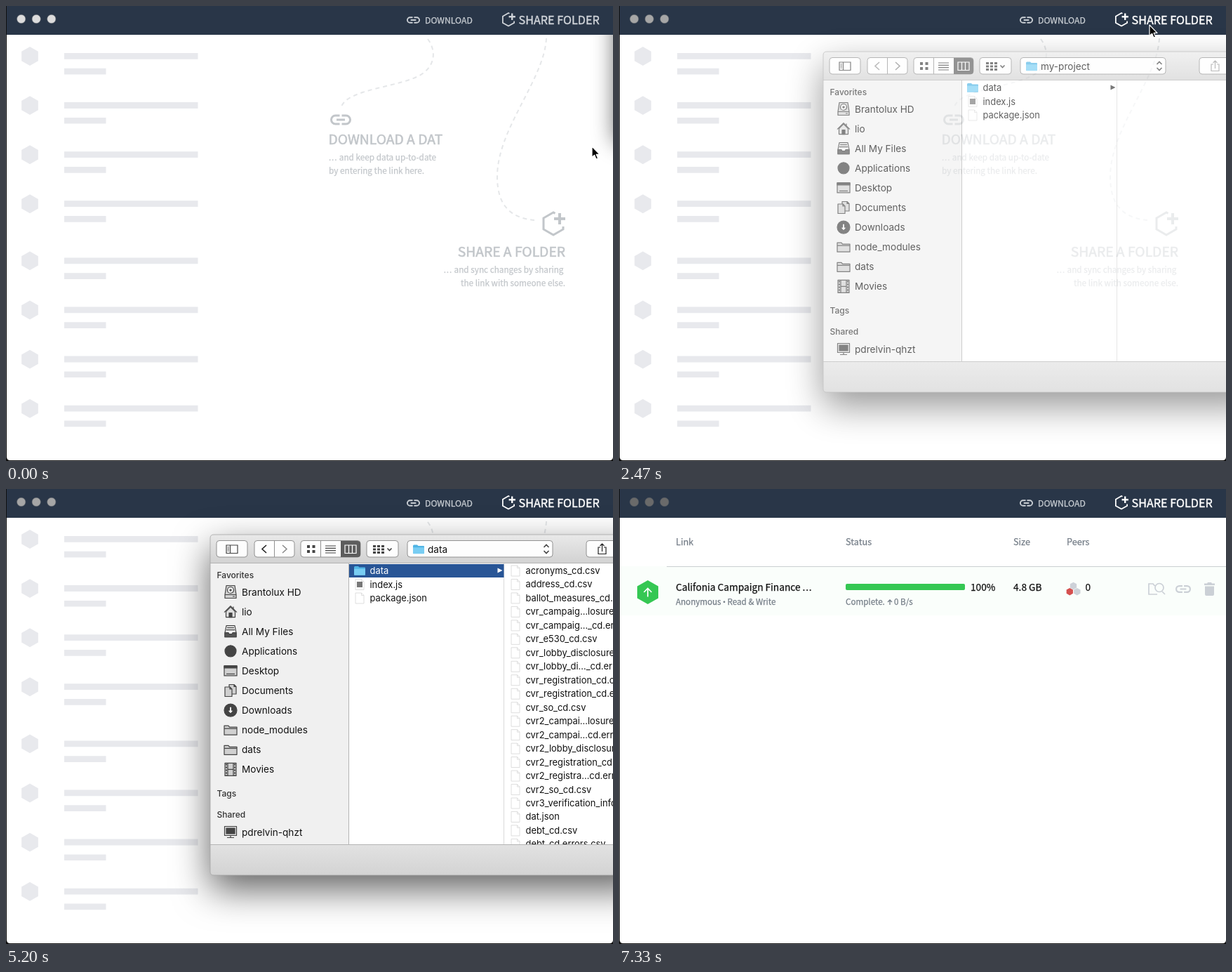
These frames come from a looping animation (865x648 px, 7390 ms). An HTML page:

```html
<!DOCTYPE html>
<html lang="en">
<head>
<meta charset="utf-8">
<title>Sharing a folder</title>
<style>
html, body { margin: 0; width: 100%; height: 100%; overflow: hidden; background: #111; }
svg { display: block; width: 865px; height: 648px; }
text { white-space: pre; }
.ui { font-family: "Noto Sans CJK SC", "Noto Sans CJK JP", "Noto Sans CJK", sans-serif; font-size: 11.6px; fill: currentColor; stroke: currentColor; stroke-width: .25px; }
.mac { font-family: Inter, sans-serif; font-size: 13.6px; fill: #111; }
.small { font-size: 12.9px; }
.label { font-size: 12px; font-weight: 500; fill: #333; }
.hint { font-size: 11.75px; }
.big { font-size: 19.3px; stroke-width: .6px; }
.col { font-size: 12.7px; }
.main { font-size: 13.7px; color: #111; }
.end { text-anchor: end; }
.dots { letter-spacing: .8px; }
.bullet { font-family: Roboto, sans-serif; }
.line { fill: none; stroke: currentColor; }
.button { fill: #fdfdfd; stroke: #919191; }

.lights, .share, .edge, .empty, .list, .before, .after, .dialog, .closed, .opened, .nav, .glow, .cursor, .arrow, .hand {
  animation: 7390ms linear infinite;
}
.lights { animation-name: lights; animation-timing-function: step-end; }
.share { animation-name: share; }
.edge { animation-name: edge; }
.empty { animation-name: empty; animation-timing-function: step-end; }
.list { animation-name: list; animation-timing-function: step-end; }
.before { animation-name: before; animation-timing-function: step-end; }
.after { animation-name: after; animation-timing-function: step-end; }
.dialog { animation-name: dialog; }
.closed { animation-name: closed; animation-timing-function: step-end; }
.opened { animation-name: opened; animation-timing-function: step-end; }
.nav { animation-name: nav; animation-timing-function: step-end; }
.glow { animation-name: glow; }
.cursor { animation-name: cursor; animation-timing-function: ease-in-out; }
.arrow { animation-name: arrow; animation-timing-function: step-end; }
.hand { animation-name: hand; animation-timing-function: step-end; }

@keyframes lights { 0% { fill: #dcdcdc } 28% { fill: #6a6a6a } 33.4% { fill: #a6a6a6 } 74% { fill: #6a6a6a } }
@keyframes share { 0%, 26.1% { color: #d0d4d9 } 29%, 100% { color: #fff } }
@keyframes edge { 0%, .9% { opacity: .62 } 6.3%, 100% { opacity: 0 } }
@keyframes empty { 0% { visibility: visible } 74%, 100% { visibility: hidden } }
@keyframes list { 0% { visibility: hidden } 74%, 100% { visibility: visible } }
@keyframes before { 0% { opacity: 1 } 76.7%, 100% { opacity: 0 } }
@keyframes after { 0% { opacity: 0 } 76.7%, 100% { opacity: 1 } }
@keyframes dialog {
  0%, 33.39% { opacity: 0 } 33.4% { opacity: .65 } 34.2% { opacity: .95 }
  36.9%, 73.99% { opacity: 1 } 74%, 100% { opacity: 0 }
}
@keyframes closed { 0% { opacity: 1 } 46.9%, 100% { opacity: 0 } }
@keyframes opened { 0% { opacity: 0 } 46.9%, 100% { opacity: 1 } }
@keyframes nav { 0% { color: #999 } 46.9%, 100% { color: #222 } }
@keyframes glow { 0%, 74% { opacity: 1 } 82.9% { opacity: .14 } 100% { opacity: .12 } }
@keyframes cursor {
  0%, .95% { transform: translate(835px, 200px) }
  6.36%, 10.83% { transform: translate(811px, 218px) }
  16.24% { transform: translate(747px, 51px) }
  20.7%, 26.1% { transform: translate(748px, 27px) }
  28%, 40.6% { transform: translate(756px, 27px) }
  45.06%, 57.78% { transform: translate(677px, 118px) }
  60.49%, 67.66% { transform: translate(790px, 264px) }
  70.37%, 100% { transform: translate(885px, 500px) }
}
@keyframes arrow { 0% { opacity: 1 } 14.5% { opacity: 0 } 28%, 100% { opacity: 1 } }
@keyframes hand { 0% { opacity: 0 } 14.5% { opacity: 1 } 28%, 100% { opacity: 0 } }
</style>
</head>
<body>
<svg viewBox="0 0 865 648">
  <defs>
    <path id="hex" d="M0-17L15-8.5V8.5L0 17L-15 8.5V-8.5Z"/>
    <path id="link" class="line" stroke-width="2" d="M-1-4H-5a4 4 0 0 0 0 8h4M1-4H5a4 4 0 0 1 0 8h-4M-4 0h8"/>
    <g id="add" class="line">
      <path stroke-width="3" d="M2.5-14.6L0-16L-14-8V8L0 16L14 8V4"/>
      <path stroke-width="4" d="M9-15V1M1-7H17"/>
    </g>
    <path id="page" fill="#fff" stroke="#d6d6d6" stroke-width=".8" d="M-6-7.5H2.5L6-4V7.5H-6ZM2.5-7.5V-4H6"/>
    <g id="folder">
      <path fill="#4fb4e4" d="M-8-5q0-1.5 1.5-1.5H-2l1.5 1.5H7q1 0 1 1V6H-8Z"/>
      <path fill="#78cdf3" d="M-8-2.8H8V5.2q0 1-1 1H-7q-1 0-1-1Z"/>
    </g>
    <linearGradient id="bar" x2="0" y2="1"><stop stop-color="#e9e9e9"/><stop offset="1" stop-color="#d2d2d2"/></linearGradient>
    <linearGradient id="foot" x2="0" y2="1"><stop stop-color="#e2e2e2"/><stop offset="1" stop-color="#d3d3d3"/></linearGradient>
    <clipPath id="window"><path d="M1 0H865V642q0 5-5 5H6q-5 0-5-5Z"/></clipPath>
    <clipPath id="column"><path d="M710 106H865V506H710Z"/></clipPath>
  </defs>

  <g clip-path="url(#window)">
    <rect width="865" height="648" fill="#fff"/>

    <g class="empty" color="#c2c6ca">
      <g id="skeleton" fill="#e8e9ed"></g>
      <path class="line" color="#e5e7e9" stroke-width="2" stroke-dasharray="6 5" d="M601 47C612 62 613 82 594 96C566 116 484 117 477.500 145M770 46C767 105 700 175 700 243C700 285 720 302 753 305"/>
      <use href="#link" transform="translate(477 162) scale(1.5)"/>
      <text class="ui big" x="459.500" y="197">DOWNLOAD A DAT</text>
      <text class="ui hint" x="460" y="220"><tspan class="dots">...</tspan> and keep data up-to-date</text>
      <text class="ui hint" x="460" y="239">by entering the link here.</text>
      <use href="#add" x="780" y="310"/>
      <text class="ui big end" x="797" y="357">SHARE A FOLDER</text>
      <text class="ui hint end" x="794.500" y="380"><tspan class="dots">...</tspan> and sync changes by sharing</text>
      <text class="ui hint end" x="797" y="399">the link with someone else.</text>
    </g>
    <rect class="edge" x="868" y="-60" width="100" height="255" style="filter: blur(16px)"/>

    <g class="list" color="#747d87">
      <text class="ui col" x="81" y="80">Link</text>
      <text class="ui col" x="323" y="80">Status</text>
      <rect class="glow" y="110" width="865" height="70" fill="#d3f3dc"/>
      <path d="M68 110.500H865" stroke="#cbcfd2"/>
      <text class="ui" x="81" y="165">Anonymous <tspan class="bullet">•</tspan> Read &amp; Write</text>
      <g id="rows"></g>
      <g color="#cbd0d6" class="line" stroke-width="1.700">
        <path d="M767 150H755V135H761L763 137.500H764M774 146L778 150"/>
        <circle cx="770" cy="140.500" r="6"/>
        <use href="#link" transform="translate(804 142.500) scale(1.1)"/>
        <path fill="currentColor" stroke="none" d="M834 134.500H838L839 133H844L845 134.500H849V137H834ZM835 138.500H848V150q0 2-2 2H837q-2 0-2-2Z"/>
      </g>
    </g>

    <rect width="865" height="41" fill="#293648"/>
    <g class="lights" stroke="#555b64" stroke-width=".6">
      <circle cx="21.700" cy="18.500" r="6.200"/><circle cx="43.200" cy="18.500" r="6.200"/><circle cx="64.800" cy="18.500" r="6.200"/>
    </g>
    <g color="#cbd0d5">
      <use href="#link" transform="translate(580.500 20) scale(.95)"/>
      <text class="ui" x="597" y="25" style="font-size: 12.200px">DOWNLOAD</text>
    </g>
    <g class="share">
      <use href="#add" transform="translate(716 19.300) scale(.58)"/>
      <text class="ui" x="730.500" y="26" style="font-size: 16.200px; stroke-width: .4px">SHARE FOLDER</text>
    </g>

    <g class="dialog">
      <rect x="291" y="65" width="620" height="485" rx="5" fill="#fff" style="filter: drop-shadow(0 20px 26px rgba(0, 0, 0, .62))"/>
      <path fill="url(#bar)" d="M291 106V70q0-5 5-5H865V106Z"/>
      <path fill="#f0f0f0" d="M291 106H488V506H291Z"/>
      <path fill="url(#foot)" d="M291 506H865V550H296q-5 0-5-5Z"/>
      <path class="line" color="#b4b4b4" d="M291 105.500H865M291 506.500H865M488.500 106V506"/>
      <path class="line" color="#d9d9d9" d="M709.500 106V506"/>
      <path class="line" color="#a5a5a5" stroke-width=".8" d="M865 65H296q-5 0-5 5V545q0 5 5 5H865"/>

      <g id="buttons"></g>
      <path fill="#5c5c5c" d="M477 74H501q4 0 4 4V93q0 4-4 4H477Z"/>
      <g class="line" color="#444" stroke-width="1.200">
        <path d="M314 80H330V91.500H314ZM319.500 80V91.500M315.500 83H318M315.500 85.500H318M315.500 88H318"/>
        <path color="#919191" stroke-width="1" d="M382.500 74V97M448.500 74V97"/>
        <path d="M455 81H470M455 84.300H470M455 87.600H470M455 91H470"/>
        <path color="#fff" d="M483 80H499V91.500H483ZM488.500 80V91.500M493.500 80V91.500"/>
        <path stroke-width="2.800" stroke-dasharray="4 2" d="M523 81.500H539M523 86H539M523 90.500H539"/>
        <path stroke-width="1.600" d="M543.500 84.500L546.500 87.500L549.500 84.500M766.500 83L770 79.500L773.500 83M766.500 88L770 91.500L773.500 88"/>
        <path stroke-width="1.500" color="#888" d="M394 80L400 85.500L394 91"/>
        <path stroke-width="4" stroke-dasharray="4 3.500" d="M429 82H441M429 89H441"/>
      </g>
      <g class="nav line" stroke-width="1.600">
        <path d="M371 80L365 85.500L371 91"/>
        <path stroke-width="1.200" d="M847 83H844V92.500H855V83H852M849.500 89V78M846.500 81L849.500 78L852.500 81"/>
      </g>
      <use href="#folder" x="588" y="86"/>

      <text class="mac label" x="300.500" y="126.500">Favorites</text>
      <text class="mac label" x="300.500" y="438">Tags</text>
      <text class="mac label" x="300.500" y="468">Shared</text>
      <g id="sidebar" stroke="#444" stroke-width="1.200" stroke-linejoin="round"></g>

      <g class="closed">
        <text class="mac" x="601" y="90.700">my-project</text>
        <text class="mac small" x="518.500" y="121">data</text>
        <path fill="#333" d="M700.500 112.500L707.500 116L700.500 119.500Z"/>
      </g>
      <g class="opened">
        <text class="mac" x="601" y="90.700">data</text>
        <rect x="489" y="107" width="220.500" height="19" fill="#285596"/>
        <text class="mac small" x="518.500" y="121" style="fill: #fff">data</text>
        <path fill="#fff" d="M700.500 112.500L707.500 116L700.500 119.500Z"/>
        <g id="files" clip-path="url(#column)"></g>
      </g>
      <use href="#folder" x="504" y="116.500"/>
      <use href="#page" x="504" y="136"/>
      <path fill="#777" d="M500 132H508V140H500Z"/>
      <use href="#page" x="504" y="155.500"/>
      <text class="mac small" x="518.500" y="140.500">index.js</text>
      <text class="mac small" x="518.500" y="160">package.json</text>
    </g>
  </g>

  <g class="cursor" stroke-linejoin="round">
    <path class="arrow" stroke="#fff" stroke-width="1.200" d="M0 0V15.500L3.600 12.300L6 18L8.600 17L6.200 11.400H11Z"/>
    <path class="hand" fill="#fff" stroke="#111" stroke-width="1.300" d="M-3 8.500L-4.500 4.500L-8 .5q0-2.400 2.500-.8L-4 1L-5.700-5q.4-2.300 2.200-.8L-2.200-2V-7.500q1.100-2 2.400 0V-2L1.600-7q1.700-1.400 2.300.5L3-1.200L5.600-4.600q2.100-.8 1.900 1.200L6 3.500L4 8.500ZM-1.500 2V5.500M.7 2V5.500M2.900 2V5.500"/>
  </g>
</svg>

<script>
const fill = (id, parts) => { document.getElementById(id).innerHTML = parts.join(""); };
const at = (x, y, body) => `<g transform="translate(${x} ${y})">${body}</g>`;

fill("skeleton", Array.from({ length: 8 }, (_, i) => at(0, 71.5 + 70.1 * i + (i > 3 ? 11 : 0),
  `<use href="#hex" transform="translate(34) scale(.79)"/>
   <path d="M83-4.500H273.500V4.300H83ZM83 17.300H142.500V26H83Z"/>`)));

// Transfer row, before and after syncing starts
const states = [
  { name: "before", title: "#ef5b9826f7adcf89974eb3bf", status: "Paused.", peers: "N/A", shift: 0,
    hex: "#bfc2ca", bar: "#a2a7b2",
    icon: "M-5.500-1a5.500 5.500 0 0 1 10-2M5.500-5.500V-2.500H2M5.500 1a5.500 5.500 0 0 1-10 2M-5.500 5.500V2.500H-2" },
  { name: "after", title: "Califonia Campaign Finance ", status: "Complete.", peers: "0", shift: 2,
    hex: "#35c753", bar: "#35c753", icon: "M0 6.500V-5.500M-5.500 0L0-5.500L5.500 0" },
];
const dot = (x, y, color) => `<use href="#hex" transform="translate(${x} ${y}) scale(.31)" fill="${color}"/>`;
fill("rows", states.map(s => `<g class="${s.name}">
  <use href="#hex" x="41" y="147" fill="${s.hex}"/>
  ${at(41, 147, `<path class="line" color="#fff" stroke-width="1.700" d="${s.icon}"/>`)}
  <text class="ui main" x="81" y="145">${s.title}<tspan class="dots">...</tspan></text>
  <rect x="323" y="135" width="${168 + s.shift}" height="9" rx="2" fill="${s.bar}"/>
  <text class="ui" x="323" y="165">${s.status}</text>
  ${s.shift ? `<path class="line" stroke-width="1.300" d="M386 165V158M383 161L386 158L389 161"/>
    <text class="ui" x="392" y="165">0 B/s</text>` : ""}
  ${at(s.shift, 0, `
    <text class="ui col" x="560" y="80">Size</text>
    <text class="ui col" x="636" y="80">Peers</text>
    <text class="ui main" x="499" y="145">100%</text>
    <text class="ui main" x="560" y="145">4.8 GB</text>
    <text class="ui main" x="662.500" y="145">${s.peers}</text>
    ${dot(645.5, 138, "#cdd1d8")}${dot(640.3, 146.2, "#d5504f")}${dot(650.8, 146.2, "#cdd1d8")}`)}
</g>`));

fill("buttons", [[300, 44], [354, 57], [420, 85], [514, 45], [572, 207], [827, 45]].map(([x, w]) =>
  `<rect class="button" x="${x}" y="73.500" width="${w}" height="23.500" rx="4"/>`));

const shape = (d, color = "#d0d0d0") => `<path fill="${color}" d="${d}"/>`;
const folder = shape("M-9-6H-3L-1.500-4H9V7H-9ZM-9-2H9");
const places = [
  ["Brantolux HD", shape("M-6-9H6L8 4V9H-8V4ZM-8 4H8M3 6.500H6") + '<circle cy="-2.500" r="4.500" fill="#eee"/><circle cy="-2.500" r="1" fill="#444"/>'],
  ["lio", shape("M-6.500 0V8H6.500V0L0-6.500ZM4-7V-4", "#ddd") + shape("M-9 1L0-8L9 1", "none") + shape("M-2 8V2H2V8Z", "#444")],
  ["All My Files", shape("M-6-8H6L8 2V8H-8V2Z", "#eee") + shape("M-8 2H-3L-2 4H2L3 2H8V8H-8ZM-5-5H5M-6-2H6", "#555")],
  ["Applications", '<circle r="8" fill="#444"/>'],
  ["Desktop", shape("M-9-7H9V7H-9Z") + shape("M-9-7H9V-4H-9Z", "#444") + shape("M-6 4.500H6", "none")],
  ["Documents", shape("M-2-8.500H5L8-5.500V5H-2ZM5-8.500V-5.500H8") + shape("M-8-5H-1L2-2V8.500H-8ZM-1-5V-2H2")],
  ["Downloads", '<circle r="9" fill="#444"/>' + shape("M-1.500-5H1.500V0H4.500L0 5L-4.500 0H-1.500Z", "#fff")],
  ["node_modules", folder],
  ["dats", folder],
  ["Movies", shape("M-8-9H8V9H-8ZM-4-9V9M4-9V9M-4 0H4") + '<path stroke-width="2" stroke-dasharray="2" d="M-6-8V9M6-8V9"/>'],
  ["pdrelvin-qhzt", shape("M-8.500-8H8.500V5H-8.500ZM-5 8H5M0 5V8", "#ddd") + shape("M-6-5.500H6V2.500H-6Z", "#444")],
];
fill("sidebar", places.map(([name, icon], i) => at(320, i < 10 ? 146.5 + 28.1 * i : 488.5,
  `${icon}<text class="mac" x="16" y="5" stroke="none">${name}</text>`)));

const names = `acronyms_cd.csv address_cd.csv ballot_measures_cd.csv cvr_campaig…losure_cd.csv
  cvr_campaig…_cd.errors.csv cvr_e530_cd.csv cvr_lobby_disclosure_cd.csv cvr_lobby_di…_cd.errors.csv
  cvr_registration_cd.csv cvr_registration_cd.errors.csv cvr_so_cd.csv cvr2_campai…losure_cd.csv
  cvr2_campai…cd.errors.csv cvr2_lobby_disclosure_cd.csv cvr2_registration_cd.csv
  cvr2_registra…cd.errors.csv cvr2_so_cd.csv cvr3_verification_info_cd.csv dat.json debt_cd.csv
  debt_cd.errors.csv`.split(/\s+/);
fill("files", names.map((name, i) => at(726, 116.5 + 19.47 * i,
  `<use href="#page"/><text class="mac small" x="14.500" y="4.500">${name}</text>`)));
</script>
</body>
</html>
```
